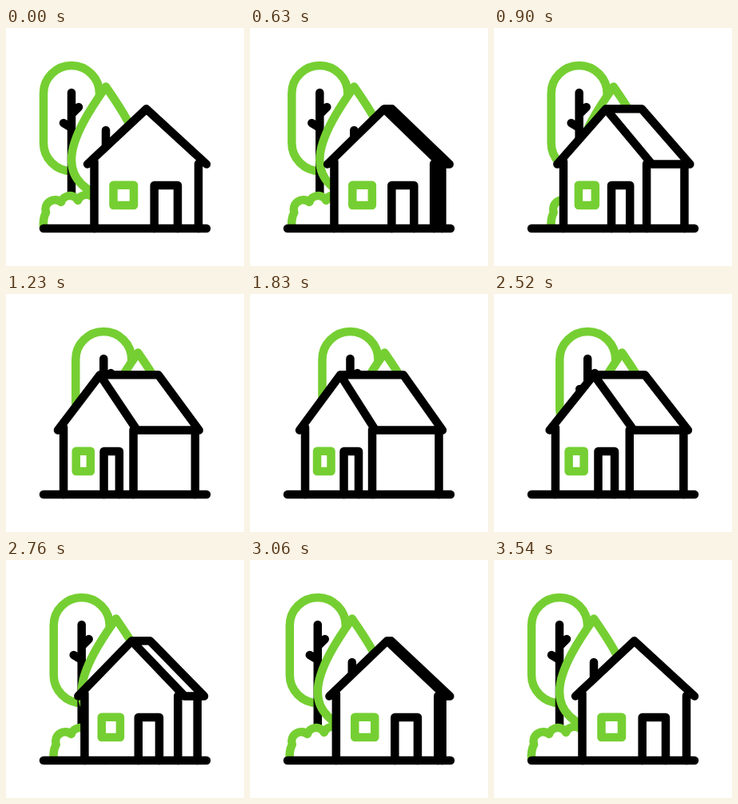
Animation of 298x298 px, one loop 3600 ms. Source, as an HTML page:

```html
<!DOCTYPE html>
<html lang="en">
<head>
<meta charset="utf-8">
<title>House and trees</title>
<style>
html, body { margin: 0; width: 100%; height: 100%; overflow: hidden; background: #fff; }
svg { display: block; width: 100vw; height: 100vh; }
path { fill: none; stroke: #000; stroke-width: 10.5; stroke-linecap: round; stroke-linejoin: round; }
.green { stroke: #75cf32; }
.solid { fill: #fff; }
</style>
</head>
<body>
<svg viewBox="0 0 298 298">
  <g id="trees">
    <path class="green" d="M47 82a35 35 0 0 1 70 0v62a35 35 0 0 1-70 0z"/>
    <path d="M82 81V240M82 108l9-9M82 125l-10-6"/>
    <path class="green solid" d="M125 73.5C110 95 82 135 82 165C82 190 102 208 125 208S168 190 168 165C168 135 140 95 125 73.5z"/>
    <path d="M125 128V240"/>
    <path class="green solid" d="M47 249Q46 239 50 231A12 12 0 0 1 69 218A11.5 11.5 0 0 1 90 216A11.5 11.5 0 0 1 112 218V251"/>
  </g>
  <path id="fill" class="solid" style="stroke:none"/>
  <path id="window" class="green"/>
  <path id="lines"/>
  <path d="M47 251H251"/>
</svg>
<script>
const LOOP = 3600, HALF = LOOP / 2, LEAD = 20, EASE = 0.83;
const el = id => document.getElementById(id);
const trees = el('trees'), fill = el('fill'), pane = el('window'), lines = el('lines');

// Symmetric cubic-bezier(EASE, 0, 1 - EASE, 1)
function ease(x) {
  let lo = 0, hi = 1, s = 0.5;
  for (let i = 0; i < 24; i++) {
    s = (lo + hi) / 2;
    const r = 1 - s;
    const bx = 3 * EASE * s * r * r + 3 * (1 - EASE) * s * s * r + s * s * s;
    if (bx < x) lo = s; else hi = s;
  }
  return s * s * (3 - 2 * s);
}

// x positions: [front view, angled view]
const X = {
  left: [110.5, 69], corner: [241, 153], right: [241, 236.5],
  apex: [175.7, 113], ridge: [175.7, 192],
  eaveL: [102, 62], eaveF: [251, 157], eaveR: [251, 241],
  winL: [134.5, 84], winR: [160, 101.5],
  doorL: [185.7, 117.5], doorR: [215, 136]
};

function draw(p) {
  const v = {};
  for (const k in X) v[k] = (X[k][0] + (X[k][1] - X[k][0]) * p).toFixed(2);
  trees.setAttribute('transform', `translate(${(43.5 * p).toFixed(2)} 0)`);
  fill.setAttribute('d', `M${v.left} 251V167L${v.apex} 101H${v.ridge}L${v.eaveR} 170H${v.right}V251z`);
  pane.setAttribute('d', `M${v.winL} 196.7H${v.winR}V222H${v.winL}z`);
  lines.setAttribute('d',
    `M${v.eaveL} 170.5L${v.apex} 101.3L${v.eaveF} 170.5H${v.eaveR}L${v.ridge} 101.3H${v.apex}` +
    `M${v.left} 167V251M${v.corner} 170V251M${v.right} 170V251` +
    `M${v.doorL} 251V197H${v.doorR}V251`);
}

function frame() {
  const t = (performance.now() + LEAD) % LOOP;
  draw(ease((t < HALF ? t : LOOP - t) / HALF));
  requestAnimationFrame(frame);
}
frame();
</script>
</body>
</html>
```
